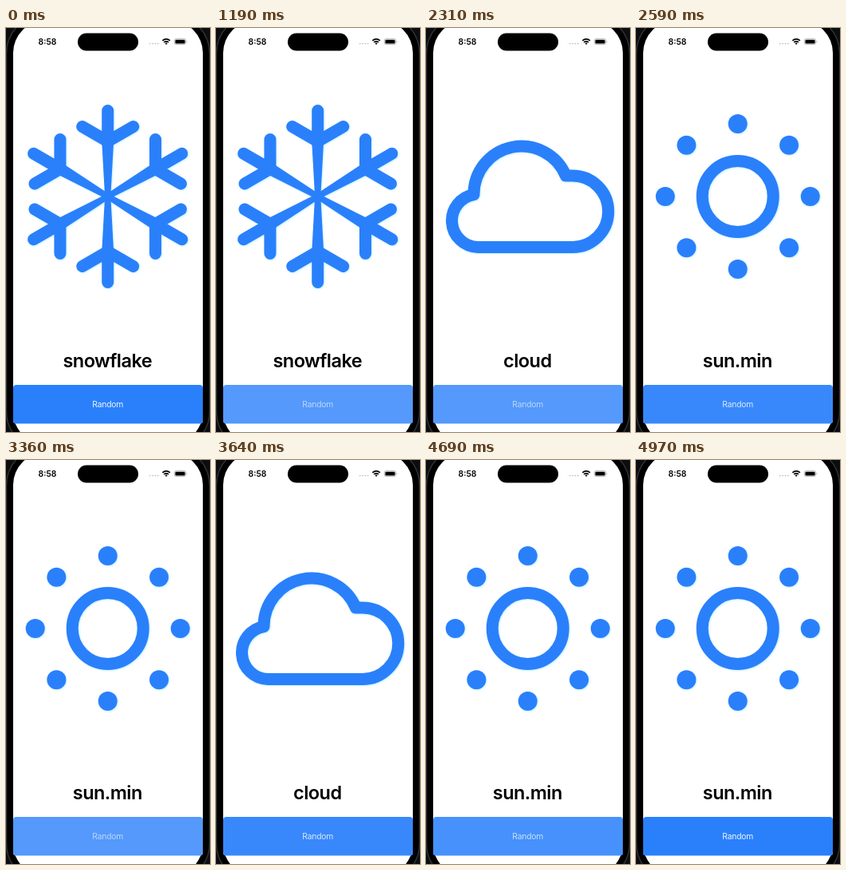
An HTML page for the animation above (5.32 s loop, 256 by 506 pixels).

```html
<!DOCTYPE html>
<html lang="en">
<head>
<meta charset="utf-8">
<title>Random symbol</title>
<style>
  @property --press { syntax: '<number>'; inherits: true; initial-value: 0; }

  html, body { margin: 0; width: 100%; height: 100%; overflow: hidden; background: #000; }
  svg { display: block; width: 100%; height: 100%; }
  text { font-family: Inter, Roboto, sans-serif; text-anchor: middle; }

  .clock { font-size: 10.3px; font-weight: 600; }
  .title { font-size: 23.5px; font-weight: 600; letter-spacing: -.55px; }
  .label { font-size: 10.3px; letter-spacing: -.2px; fill: #fff; opacity: calc(.92 - .32 * var(--press)); }
  .plate { fill: #2a80fb; opacity: calc(1 - .2 * var(--press)); }
  .icon { fill: #2a80fb; filter: drop-shadow(1px 1px .8px #c4f0ff); }
  .line { fill: none; stroke: #2a80fb; stroke-width: 15; stroke-linecap: round; stroke-linejoin: round; }

  .snow, .cloud, .sun, .button { animation: 5320ms step-end infinite; }
  .snow { animation-name: snow; }
  .cloud { animation-name: cloud; }
  .sun { animation-name: sun; }
  .button { animation-name: press; }

  @keyframes snow {
    0% { visibility: visible; }
    23.684%, 100% { visibility: hidden; }
  }
  @keyframes cloud {
    0%, 44.737%, 86.842%, 100% { visibility: hidden; }
    23.684%, 64.474% { visibility: visible; }
  }
  @keyframes sun {
    0%, 64.474% { visibility: hidden; }
    44.737%, 86.842%, 100% { visibility: visible; }
  }
  /* instant press, then a stepped fade back after release */
  @keyframes press {
    0%, 28.947%, 51.316%, 71.053%, 93.421%, 100% { --press: 0; }
    22.368%, 43.421%, 63.158%, 82.895% { --press: 1; }
    23.684% { --press: 1; animation-timing-function: steps(4, jump-both); }
    44.737%, 64.474%, 86.842% { --press: 1; animation-timing-function: steps(5, jump-both); }
  }
</style>
</head>
<body>
<svg viewBox="0 0 256 506">
  <defs>
    <g id="arm">
      <path d="M-3.6 0L-7.4 -68H7.4L3.6 0Z"/>
      <path class="line" d="M0 -69V-107.5M-32 -87.5L0 -69L32 -87.5"/>
    </g>
    <circle id="dot" cy="-91" r="12"/>
  </defs>

  <!-- phone -->
  <rect width="256" height="506" fill="#0b0d10"/>
  <rect x=".5" y="-17" width="255" height="546" rx="49" stroke="#303132" stroke-width="1.5"/>
  <rect x="9" y="-9" width="238" height="530" rx="40" fill="#fff"/>
  <rect x="90" y="6.5" width="76" height="22" rx="11"/>

  <!-- status bar -->
  <text class="clock" x="52" y="21">8:58</text>
  <path d="M180.8 19.6h11" fill="none" stroke="#b4b4b4" stroke-width="1.6" stroke-linecap="round" stroke-dasharray="0 3.3"/>
  <g fill="none" stroke="#000" stroke-width="1.7">
    <path d="M196.4 15.9A6.7 6.7 0 0 1 205.8 15.9"/>
    <path d="M198.2 18A4.1 4.1 0 0 1 204 18"/>
  </g>
  <path d="M201.1 21L199.5 19.3A2.3 2.3 0 0 1 202.7 19.3Z"/>
  <rect x="211.3" y="13.6" width="14.4" height="7" rx="2.2" fill="none" stroke="#999" stroke-width=".7"/>
  <rect x="212.4" y="14.7" width="12.2" height="4.8" rx="1.3"/>
  <path d="M226.6 15.9a1.3 1.3 0 0 1 0 2.4Z" fill="#999"/>

  <g class="snow">
    <g class="icon" transform="translate(127.7 211)">
      <use href="#arm"/>
      <use href="#arm" transform="rotate(60)"/>
      <use href="#arm" transform="rotate(120)"/>
      <use href="#arm" transform="rotate(180)"/>
      <use href="#arm" transform="rotate(240)"/>
      <use href="#arm" transform="rotate(300)"/>
    </g>
    <text class="title" x="127.3" y="425">snowflake</text>
  </g>

  <g class="cloud">
    <g class="icon">
      <path class="line" d="M65 274.5A33.2 33.2 0 0 1 60 208.6A60 60 0 0 1 175.4 185H184A44.75 44.75 0 0 1 184 274.5Z"/>
    </g>
    <text class="title" x="127.3" y="425">cloud</text>
  </g>

  <g class="sun">
    <g class="icon" transform="translate(127.7 211)">
      <circle class="line" r="44.5"/>
      <use href="#dot"/>
      <use href="#dot" transform="rotate(45)"/>
      <use href="#dot" transform="rotate(90)"/>
      <use href="#dot" transform="rotate(135)"/>
      <use href="#dot" transform="rotate(180)"/>
      <use href="#dot" transform="rotate(225)"/>
      <use href="#dot" transform="rotate(270)"/>
      <use href="#dot" transform="rotate(315)"/>
    </g>
    <text class="title" x="127.3" y="425">sun.min</text>
  </g>

  <g class="button">
    <rect x="9" y="447" width="238" height="48.5" rx="4" fill="#fff"/>
    <rect class="plate" x="9" y="447" width="238" height="48.5" rx="4"/>
    <text class="label" x="127.7" y="475">Random</text>
  </g>
</svg>
</body>
</html>
```
